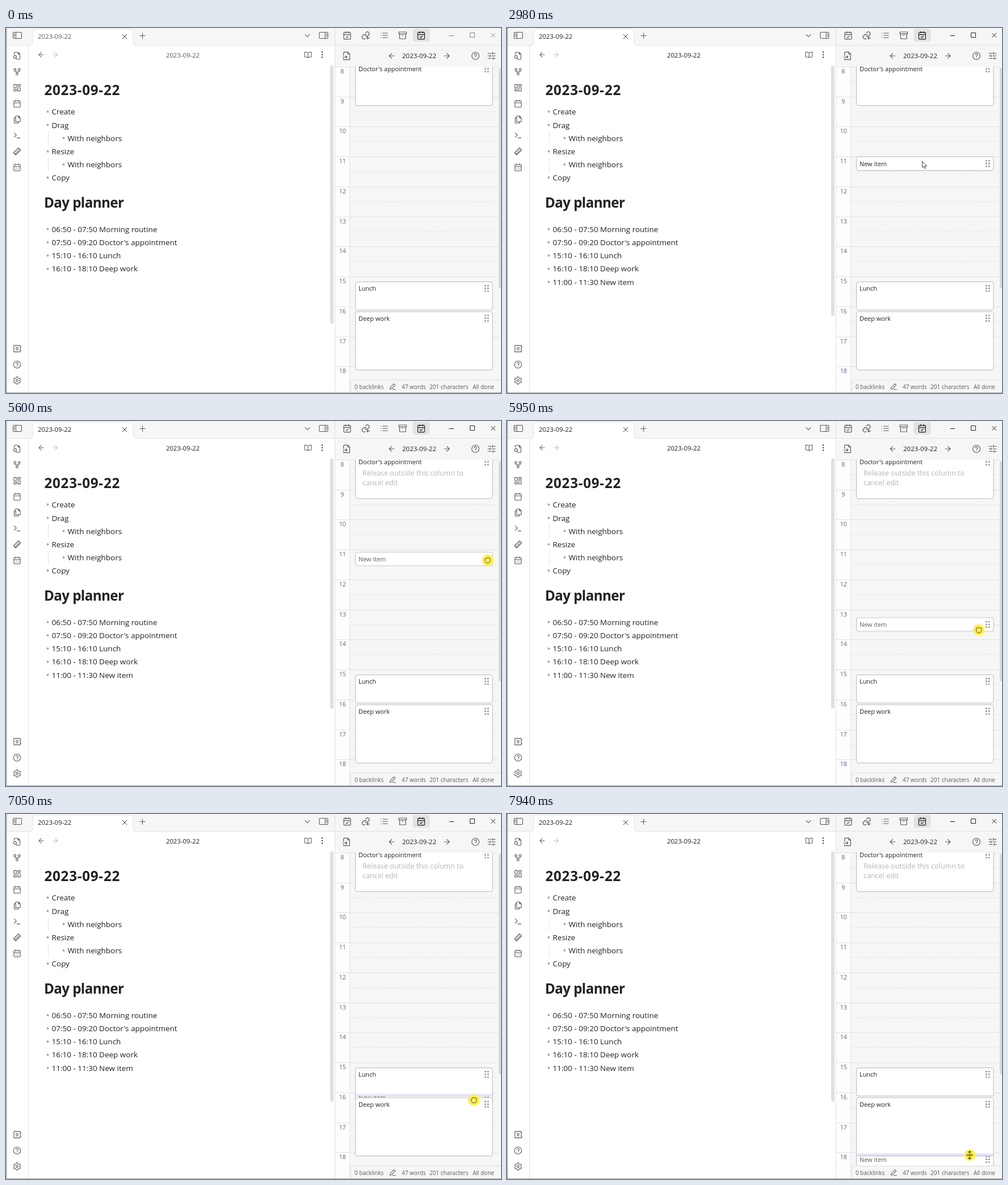
These frames come from a looping animation (872 px wide and 642 px high, 8 s). An HTML page:

```html
<!DOCTYPE html>
<html lang="en">
<head>
<meta charset="utf-8">
<title>Day planner</title>
<style>
html, body { margin: 0; width: 100%; height: 100%; overflow: hidden; background: #fff; }
svg { display: block; width: 872px; height: 642px; }
text { font-family: "Open Sans", "Noto Sans", sans-serif; fill: #222; white-space: pre; }
.line { stroke: #e2e2e2; fill: none; }
.card { fill: #fff; stroke: #b9b9b9; }
.muted { fill: #5c5c5c; }
.icon { fill: none; stroke-linecap: round; stroke-linejoin: round; }

/* One loop is 8 s, so 1% is 80 ms. */
.anim, .step { animation: 8s linear infinite; }
.step { animation-timing-function: step-end; }

#cursor { animation-name: cursor; }
@keyframes cursor {
  0%, 2.5% { transform: translate(825px, 581px); animation-timing-function: cubic-bezier(.35, .1, .4, 1); }
  11.875%, 14.375% { transform: translate(734px, 257px); animation-timing-function: ease-out; }
  18.75%, 57% { transform: translate(731px, 234px); }
  57.625% { transform: translate(758px, 234px); }
  60.875%, 64.125% { transform: translate(848px, 240px); }
  65.875%, 69.25% { transform: translate(849px, 240px); animation-timing-function: ease-in; }
  74.375% { transform: translate(831px, 367px); animation-timing-function: ease-out; }
  78.5%, 79.375% { transform: translate(829px, 436px); }
  88.125% { transform: translate(824px, 503px); }
  89%, 89.875% { transform: translate(824px, 509px); }
  99.25%, 100% { transform: translate(815px, 600px); }
}
#arrow { animation-name: arrow; }
@keyframes arrow { 0% { opacity: 0; } 2.5% { opacity: 1; } 60.375%, 100% { opacity: 0; } }
#open-hand { animation-name: open-hand; }
@keyframes open-hand { 0% { opacity: 0; } 60.375% { opacity: 1; } 69.25%, 100% { opacity: 0; } }
#fist { animation-name: fist; }
@keyframes fist { 0% { opacity: 0; } 69.25% { opacity: 1; } 98.6%, 100% { opacity: 0; } }
#resize { animation-name: resize; }
@keyframes resize { 0% { opacity: 0; } 98.6%, 100% { opacity: 1; } }
#press { animation-name: press; }
@keyframes press {
  0%, 29.6% { opacity: 0; }
  29.625%, 32% { opacity: 1; }
  33.875%, 69.2% { opacity: 0; }
  69.25%, 100% { opacity: 1; }
}

#item { animation-name: item; }
@keyframes item {
  0%, 69.25% { transform: translateY(226px); animation-timing-function: ease-in; }
  74.375% { transform: translateY(345px); animation-timing-function: ease-out; }
  78.5%, 79.375% { transform: translateY(415px); }
  82.5% { transform: translateY(446px); }
  88.125% { transform: translateY(486px); }
  89.875% { transform: translateY(499px); }
  99.25%, 100% { transform: translateY(595px); }
}
#item-body { animation-name: shown; }
@keyframes shown { 0% { opacity: 0; } 30.375%, 100% { opacity: 1; } }
#item-body text { animation-name: pending; }
@keyframes pending { 0% { fill: #5c5c5c; } 35.625% { fill: #222; } 69.25%, 100% { fill: #5c5c5c; } }
#hint { animation-name: hint; }
@keyframes hint { 0% { opacity: 0; } 30.375% { opacity: 1; } 33% { opacity: 0; } 69.25%, 100% { opacity: 1; } }
#lunch-edge { animation-name: lunch-edge; }
@keyframes lunch-edge { 0%, 85.5% { opacity: 0; } 86.3%, 87.4% { opacity: 1; } 88.125% { opacity: .7; } 89%, 100% { opacity: 0; } }
#work-edge { animation-name: work-edge; }
@keyframes work-edge { 0%, 97.8% { opacity: 0; } 98.8%, 100% { opacity: 1; } }

#window-controls { animation-name: focus; }
@keyframes focus { 0% { stroke: #858585; } 29.625%, 100% { stroke: #222; } }
.note-name { animation-name: note-name; }
@keyframes note-name { 0% { fill: #5c5c5c; } 35.625%, 100% { fill: #222; } }
#saved { animation-name: saved; }
@keyframes saved { 0% { opacity: 0; } 35.625%, 100% { opacity: 1; } }
#scroll { animation-name: scroll; }
@keyframes scroll { 0% { height: 454px; } 35.625%, 100% { height: 440px; } }
#status { animation-name: status; }
@keyframes status { 0% { opacity: 1; } 29.625% { opacity: 0; } 35.625%, 100% { opacity: 1; } }
</style>
</head>
<body>
<script>
const HOUR = 52.75, HOUR_9 = 120.7;

const text = (x, y, str, size, attrs = '') =>
  `<text x="${x}" y="${y}" font-size="${size}" ${attrs}>${str}</text>`;
const rect = (x, y, w, h, attrs = '') =>
  `<rect x="${x}" y="${y}" width="${w}" height="${h}" ${attrs}/>`;
const line = (d, attrs = '') => `<path class="line" d="${d}" ${attrs}/>`;

// Icons are stroked paths in a 24 unit box, centred on (x, y).
const icon = (x, y, d, size = 15, color = '#5a5a5a') =>
  `<path class="icon" stroke="${color}" stroke-width="1.8" d="${d}"
    transform="translate(${x - size / 2} ${y - size / 2}) scale(${size / 24})"/>`;
const ring = (x, y, r) => `M${x - r} ${y}a${r} ${r} 0 1 0 ${2 * r} 0a${r} ${r} 0 1 0 ${-2 * r} 0`;
const box = (x, y, w, h) => `M${x} ${y}h${w}v${h}h${-w}z`;

const gear = 'M' + Array.from({ length: 72 }, (_, i) => {
  const a = i * Math.PI / 36, r = 9 + 1.5 * Math.tanh(2 * Math.cos(6 * a));
  return `${(12 + r * Math.sin(a)).toFixed(1)} ${(12 - r * Math.cos(a)).toFixed(1)}`;
}).join('L') + 'z' + ring(12, 12, 3);

const calendar = 'M5 4h14a2 2 0 0 1 2 2v14a2 2 0 0 1-2 2H5a2 2 0 0 1-2-2V6a2 2 0 0 1 2-2zM16 2v4M8 2v4M3 10h18';
const icons = {
  calendar,
  check: calendar + 'M9 16l2 2 4-4',
  days: calendar + 'M8 14v.1M12 14v.1M16 14v.1M8 18v.1M12 18v.1M16 18v.1',
  search: 'M4 8V4a2 2 0 0 1 2-2h9l5 5v13a2 2 0 0 1-2 2h-7M15 2v5h5M9 18l2 2' + ring(6, 15, 4),
  fork: ring(12, 18, 3) + ring(6, 6, 3) + ring(18, 6, 3) + 'M18 9v2l-1 1H7l-1-1V9M12 12v3',
  board: box(3, 3, 7, 9) + box(14, 3, 7, 5) + box(14, 12, 7, 9) + box(3, 16, 7, 5),
  files: 'M8 2h8l5 5v11H8zM16 2v5h5M8 7H4v15h12v-4',
  terminal: 'M4 17l6-6-6-6M12 19h8',
  ruler: 'M2 16L16 2l6 6L8 22zM14.5 12.5l-2-2M11.5 15.5l-2-2M8.5 18.5l-2-2M17.5 9.5l-2-2',
  vault: box(3, 3, 18, 18) + ring(12, 11, 3) + 'M12 14v3M21 7h2M21 17h2',
  help: ring(12, 12, 10) + 'M9 9a3 3 0 0 1 6 1c0 2-3 2.5-3 4M12 17v.1',
  gear,
  left: 'M19 12H5M12 19l-7-7 7-7',
  right: 'M5 12h14M12 5l7 7-7 7',
  book: 'M12 7c-1-3-4-3-10-3v15c6 0 9 0 10 2 1-2 4-2 10-2V4c-6 0-9 0-10 3v14',
  link: 'M10 13a5 5 0 0 0 7.5.5l3-3a5 5 0 0 0-7-7l-1.7 1.7M14 11a5 5 0 0 0-7.5-.5l-3 3a5 5 0 0 0 7 7M15 19h7M18 16l-3 3 3 3',
  list: 'M8 6h13M8 12h13M8 18h13M3 6v.1M3 12v.1M3 18v.1',
  archive: box(2, 3, 20, 5) + 'M4 8v13h16V8M10 12h4',
  fileIn: 'M4 11V4a2 2 0 0 1 2-2h9l5 5v15H4v-3M15 2v5h5M2 15h11M10 12l3 3-3 3',
  sliders: 'M22 5h-8M10 5H2M22 12h-10M8 12H2M22 19h-6M12 19H2M14 2v6M8 9v6M16 16v6',
  pencil: 'M12 21h9M4 20l1-5L16 4l4 4L9 19z',
  close: 'M5 5l14 14M19 5L5 19',
  plus: 'M12 4v16M4 12h16',
  down: 'M5 8.5l7 7 7-7'
};

const bullet = (x, y, str) =>
  `<circle cx="${x}" cy="${y}" r="2" fill="#a9a9a9"/>` + text(x + 7, y + 5, str, 13.47);

const grip = y => [844.3, 849.2].map(x => [-4.8, 0, 4.8].map(dy =>
  `<circle cx="${x}" cy="${y + dy}" r="1.4" fill="#8c8c8c"/>`).join('')).join('');

const card = (y, h, label, labelY = y + 12) =>
  rect(615.5, y + .5, 241.5, h, 'rx="3.5" class="card"') +
  text(621, labelY + 4, label, 10.9, 'class="step"') + grip(labelY);

const chrome = () => {
  const ribbon = ['search', 'fork', 'board', 'calendar', 'files', 'terminal', 'ruler', 'days'];
  const footer = ['vault', 'help', 'gear'];
  const sidebar = x => rect(x - 7.5, 7.5, 15, 11, 'rx="1.5" fill="none" stroke="#5a5a5a" stroke-width="1.1"');
  return rect(0, 0, 872, 30, 'fill="#f6f6f6"') +
    rect(580, 0, 292, 642, 'fill="#f6f6f6"') +
    line('M0 30.5H872M39.5 30V642M579.5 0V642') +
    '<path d="M41 31q6 0 6-6V8q0-6 6-6H218q6 0 6 6V25q0 6 6 6z" fill="#fff"/>' +
    line('M41 30.5q6 0 6-6V8q0-6 6-6H218q6 0 6 6V24.500q0 6 6 6') +
    sidebar(20) + sidebar(559.5) +
    '<path d="M17.5 8v10M14 10.500h2M14 12.500h2M14 14.500h2M562 8v10M563.500 10.500h2M563.500 12.500h2M563.500 14.500h2" stroke="#5a5a5a"/>' +
    ribbon.map((n, i) => icon(19.5, 49 + i * 28, icons[n])).join('') +
    footer.map((n, i) => icon(19.5, 564 + i * 28, icons[n])).join('') +
    text(56, 19, '2023-09-22', 11.35, 'class="note-name step"') +
    text(311.5, 51.5, '2023-09-22', 11.35, 'class="note-name step" text-anchor="middle"') +
    icon(209, 15, icons.close, 13, '#333') + icon(240.5, 13.5, icons.plus, 14) + icon(531, 13.5, icons.down, 14) +
    icon(62, 47, icons.left, 14) + icon(86.5, 47, icons.right, 14, '#bdbdbd') +
    icon(532, 47, icons.book, 14) +
    [42.5, 47, 51.5].map(y => `<circle cx="557" cy="${y}" r="1.2" fill="#444"/>`).join('');
};

const note = () =>
  text(67.5, 117.5, '2023-09-22', 24.2, 'font-weight="700" letter-spacing=".75"') +
  bullet(73.5, 147, 'Create') + bullet(73.5, 170.5, 'Drag') + bullet(101.5, 193.5, 'With neighbors') +
  bullet(73.5, 217, 'Resize') + bullet(101.5, 240, 'With neighbors') + bullet(73.5, 263, 'Copy') +
  line('M74.5 182v23M74.5 229v23') +
  text(67, 315.5, 'Day planner', 24.2, 'font-weight="700" letter-spacing="-.6"') +
  ['06:50 - 07:50 Morning routine', "07:50 - 09:20 Doctor's appointment",
    '15:10 - 16:10 Lunch', '16:10 - 18:10 Deep work']
    .map((s, i) => bullet(73.5, 353.8 + i * 23.2, s)).join('') +
  `<g id="saved" class="step">${bullet(73.5, 446.6, '11:00 - 11:30 New item')}</g>` +
  rect(571, 66, 6, 454, 'rx="2" fill="#e0e0e0" id="scroll" class="step"');

const panelHeader = () =>
  rect(716.5, 1.5, 30, 22.5, 'rx="4" fill="#e2e2e2"') +
  ['check', 'link', 'list', 'archive', 'check'].map((n, i) =>
    icon(601 + i * 32.6, 13, icons[n], 16, i === 4 ? '#222' : '#5a5a5a')).join('') +
  `<path id="window-controls" class="step" fill="none" d="M780.500 13.500h8.500${box(817.5, 8.5, 8, 8)}M854.500 9l7.500 7.500M862 9l-7.500 7.500"/>` +
  icon(600, 49, icons.fileIn, 16) + icon(679.5, 49, icons.left, 15) + icon(776.5, 49, icons.right, 15) +
  text(728, 53.3, '2023-09-22', 11.5, 'text-anchor="middle"') +
  icon(827, 49, icons.help, 15.5) + icon(855.5, 49, icons.sliders, 15.5);

const timeline = () => {
  let grid = rect(580, 68, 25, 574, 'fill="#fdfdfd"') + line('M605.5 68V642');
  for (let h = 8; h <= 18; h++) {
    const y = Math.round(HOUR_9 + (h - 9) * HOUR);
    grid += line(`M580 ${y + .5}H868`) +
      line(`M606 ${y + 26.5}H868`, 'stroke-dasharray="3 2"') +
      text(h < 10 ? 595.5 : 599, y + 12, h, 10.8, 'text-anchor="end" style="fill:#5b6a82"');
  }
  return `<g clip-path="url(#view)">${grid}
    <g id="item" class="anim"><g id="item-body" class="step">${card(0, 24, 'New item', 12.5)}</g></g>
    ${card(60, 76, "Doctor's appointment", 72)}
    ${card(446, 49.5, 'Lunch')}${card(498.5, 102.5, 'Deep work')}
    ${rect(616, 491.5, 240.5, 4, 'fill="#e6e2fa" id="lunch-edge" class="anim"')}
    ${rect(616, 597, 240.5, 4, 'fill="#e6e2fa" id="work-edge" class="anim"')}
    <g id="hint" class="step">
      ${text(628, 95.5, 'Release outside this column to', 12.5, 'style="fill:#b5b5b5"')}
      ${text(628, 113, 'cancel edit', 12.5, 'style="fill:#b5b5b5"')}
    </g></g>` + rect(868, 70, 4, 388, 'rx="2" fill="#dadada"');
};

const statusBar = () => {
  const bar = x => `<path d="M${x} 643V625q0-6 6-6H873V643z" fill="#f6f6f6" stroke="#e0e0e0"/>`;
  const label = (x, s) => text(x, 634.7, s, 10, 'class="muted"');
  return bar(815.5) + `<g id="status" class="step">${bar(607.5)}
    ${label(614, '0 backlinks')}${icon(681, 630.5, icons.pencil, 14)}
    ${label(697, '47 words')}${label(746, '201 characters')}</g>` + label(822, 'All done');
};

const cursor = () => `<g id="cursor" class="anim">
  <circle id="press" class="anim" r="10" fill="#fff04a"/>
  <path id="arrow" class="step" d="M.5 .5V11.500L3 9.200L4.800 13L6.700 12.200L5 8.500H8.500z" fill="#fff" stroke="#333" stroke-width=".9"/>
  <path id="open-hand" class="step icon" style="fill:#fff" stroke="#333" stroke-width=".9"
    d="M-3 6L-6 1q-.5-2 1.500-1.200L-3.200 1V-4.500q1-1.500 2 0V-6q1-1.500 2 0V-5q1-1.500 2 0V-3.500q1-1.500 2 0V2L3.500 6z"/>
  <path id="fist" class="step icon" style="fill:#fff36a" stroke="#4a4620" stroke-width="1"
    d="M-2.500 4.500L-4.500 1.500V-1.500q1-1 1.500-.5V-3.500q1.200-1.200 2 0q1-1.200 2 0q1.200-1 2 .3q1.500-.7 1.700 1V1.500L3 4.500z"/>
  <path id="resize" class="step icon" stroke="#3a3720" stroke-width="1.100"
    d="M-5 -1H5M-5 1H5M0 -3V-7M-2 -5L0 -7L2 -5M0 3V7M-2 5L0 7L2 5"/>
</g>`;

document.body.innerHTML = `<svg viewBox="0 0 872 642">
  <clipPath id="view">${rect(580, 68, 292, 574)}</clipPath>
  ${chrome()}${note()}${panelHeader()}${timeline()}${statusBar()}
  ${rect(0, 0, 1.5, 642, 'fill="#b0b0b0"')}${rect(0, 641, 872, 1, 'fill="#a5a5a5"')}
  ${cursor()}
</svg>`;
</script>
</body>
</html>
```
